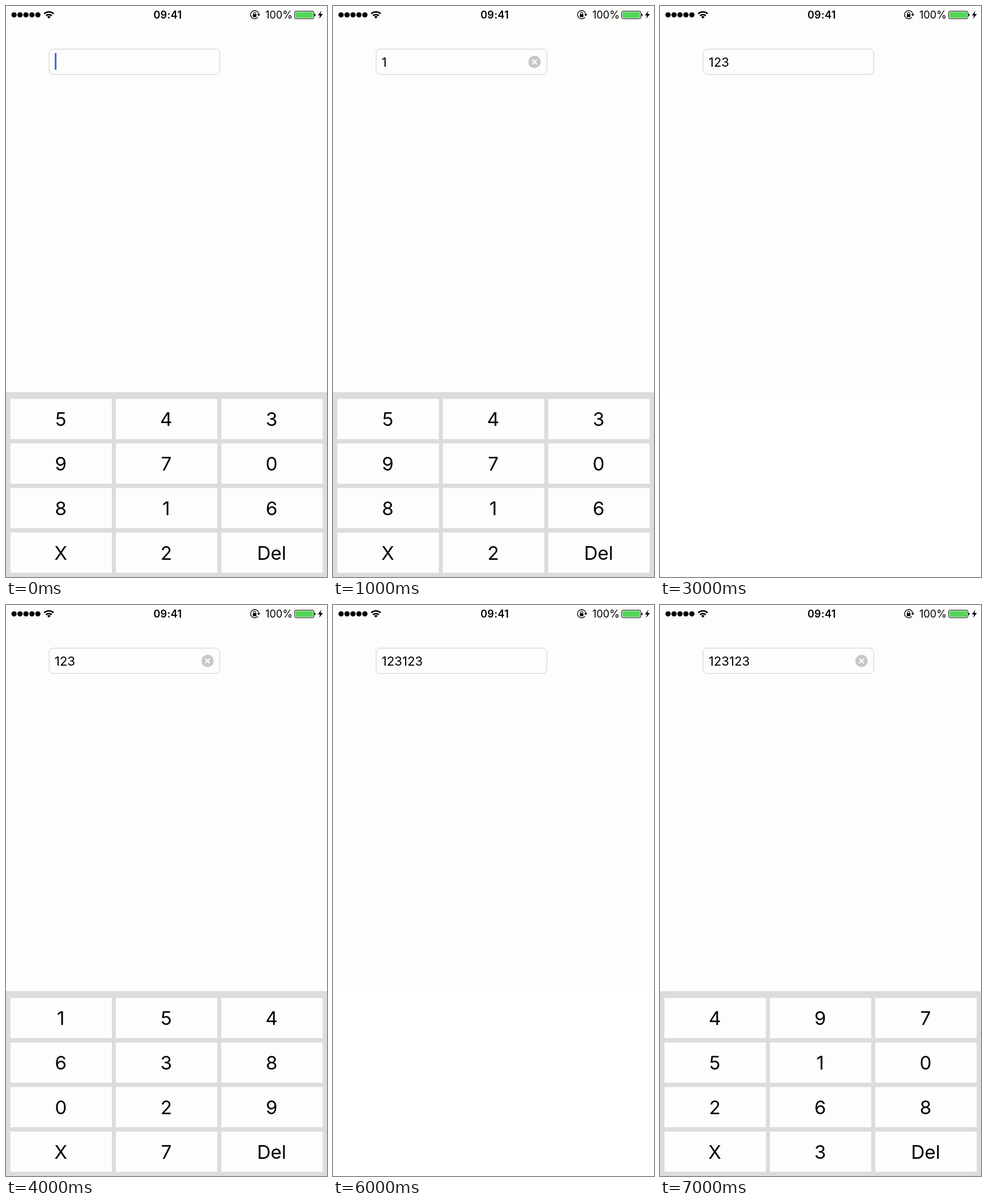
These frames come from a looping animation (561 by 998 pixels, 8 s). An HTML page:

```html
<!DOCTYPE html>
<html lang="en">
<head>
<meta charset="utf-8">
<title>Shuffled keypad</title>
<style>
  html, body { margin: 0; width: 100%; height: 100%; overflow: hidden; background: #fff; }
  svg { display: block; width: 561px; height: 998px; font-family: Inter, Roboto, sans-serif; }
  .key { font-size: 33px; text-anchor: middle; }
</style>
</head>
<body>
<svg viewBox="0 0 561 998">
  <rect width="561" height="676" fill="#fdfdfc"/>

  <g id="dots"></g>
  <g fill="none" stroke="#000" stroke-width="2.5">
    <path d="M66.8 13.6a11.7 11.7 0 0 1 16.4 0"/>
    <path d="M70 17a7.2 7.2 0 0 1 10 0"/>
  </g>
  <path d="M75 22l-2.9-3a4.2 4.2 0 0 1 5.8 0z"/>
  <text x="282.5" y="22" font-size="18" font-weight="600" letter-spacing=".3" text-anchor="middle">09:41</text>

  <path d="M440.3 19.6A7.2 7.2 0 1 1 441.7 14.4" fill="none" stroke="#000" stroke-width="1.3"/>
  <path d="M438.8 14.2h5.8l-2.9 3.5z"/>
  <rect x="431.4" y="14.3" width="6.2" height="5.2" rx=".6"/>
  <path d="M432.6 14.5v-1.6a1.9 1.9 0 0 1 3.8 0v1.6" fill="none" stroke="#000" stroke-width="1.1"/>
  <text x="477" y="22" font-size="18" text-anchor="middle">100%</text>
  <rect x="504.5" y="9" width="33.5" height="13.2" rx="2" fill="#fdfdfc" stroke="#000"/>
  <rect x="506" y="10.5" width="30.5" height="10.2" rx=".8" fill="#53d658"/>
  <path d="M539 13.2q2 .3 2 2.4t-2 2.4z"/>
  <path d="M551.3 8.2l-6.3 8.2h4l-1.8 6.2 6.6-8.6h-4.2z"/>

  <rect x="75.3" y="75.3" width="298.4" height="44.4" rx="7.5" fill="#fdfdfc" stroke="#ccc"/>
  <text id="entry" x="85" y="106" font-size="22"></text>
  <rect id="caret" y="82" width="3" height="29.5" rx="1"/>
  <g id="clear">
    <circle cx="352.2" cy="97.8" r="10.7" fill="#c7c7c7"/>
    <path d="M348 93.6l8.4 8.4m0-8.4l-8.4 8.4" stroke="#fdfdfc" stroke-width="2.2"/>
  </g>

  <g id="pad"><rect y="674.8" width="561" height="323.2" fill="#dcdcdc"/></g>
</svg>
<script>
const $ = id => document.getElementById(id);
const BLUE = "#4362d8", FADED = "#d8d8d6";
const LOOP = 8000, STEP = 1000;

function add(parent, tag, attrs) {
  const el = document.createElementNS("http://www.w3.org/2000/svg", tag);
  for (const k in attrs) el.setAttribute(k, attrs[k]);
  return parent.appendChild(el);
}

for (let i = 0; i < 5; i++) add($("dots"), "circle", { cx: 14.1 + i * 10.4, cy: 15.5, r: 4.6 });

const keys = [];
for (let i = 0; i < 12; i++) {
  const x = 7.8 + (i % 3) * 184.2, y = 686.8 + Math.floor(i / 3) * 77.85;
  add($("pad"), "rect", { x, y, width: 177.2, height: 70.2, fill: "#fdfdfc" });
  keys.push(add($("pad"), "text", { x: x + 88, y: y + 47.6, class: "key" }));
}

// digits in reading order; the bottom corners are always X and Del
const first = "5439708162", second = "1546380297", third = "4975102683";

// one state per second: typed text, key order (none = closed), caret colour
const states = [
  ["", first, BLUE],
  ["1", first],
  ["123", first, FADED],
  ["123"],
  ["123", second],
  ["123123", second, BLUE],
  ["123123"],
  ["123123", third]
];

const show = (el, on) => el.setAttribute("visibility", on ? "visible" : "hidden");

let last = -1;
function draw(ms) {
  const n = Math.floor((ms % LOOP) / STEP);
  if (n === last) return;
  last = n;
  const [text, order, caret] = states[n];
  $("entry").textContent = text;
  show($("clear"), order && text);
  show($("caret"), caret);
  if (caret) {
    $("caret").setAttribute("fill", caret);
    $("caret").setAttribute("x", 85.2 + text.length * 12.15);
  }
  show($("pad"), order);
  if (order) {
    const labels = [...order.slice(0, 9), "X", order[9], "Del"];
    keys.forEach((key, i) => key.textContent = labels[i]);
  }
}

const start = performance.now();
function tick() {
  draw(performance.now() - start);
  requestAnimationFrame(tick);
}
tick();
</script>
</body>
</html>
```
